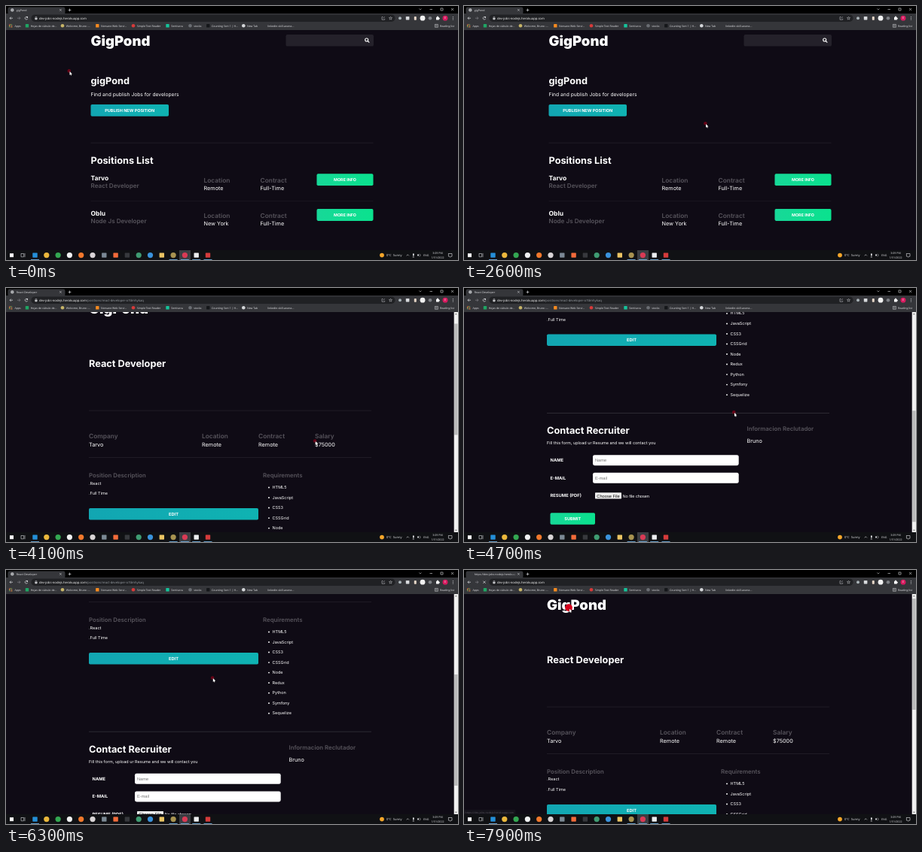
An HTML page with a canvas for the animation above (8 s loop, 600 by 338 pixels).

```html
<!DOCTYPE html>
<html lang="en">
<head>
<title>Job board walkthrough</title>
<style>
html, body { margin: 0; width: 100%; height: 100%; overflow: hidden; background: #0f0b15; }
canvas { display: block; width: 600px; height: 338px; }
</style>
</head>
<body>
<canvas id="stage"></canvas>
<script>
const W = 600, H = 338, LOOP = 8000, TOP = 32, BOTTOM = 325;
const canvas = document.getElementById('stage');
const ctx = canvas.getContext('2d');
const dpr = window.devicePixelRatio || 1;
canvas.width = W * dpr;
canvas.height = H * dpr;

const PAGE = 'Inter, sans-serif';
const UI = '"Open Sans", sans-serif';
const FORM = '"Liberation Sans", sans-serif';
const BG = '#0f0b15', GREY = '#57545c', WHITE = '#fff';
const TEAL = ['#12a6b2', '#0fb3b2'], GREEN = ['#17d898', '#0ae28e'];
const HOST = 'dev-jobs-nodejs.herokuapp.com';
const PATH = '/positions/react-developer-o7dmhykaq';

// Pointer tip as [time, x, y]; scroll offset as [time, y].
const pointerKeys = [
  [0, 84.5, 87], [100, 84.5, 87], [1100, 142.5, 52], [2100, 142.5, 52],
  [3000, 448, 231.5], [3700, 448, 231.5], [4600, 359, 166], [4900, 359, 166],
  [5400, 361, 166], [5700, 361, 166], [6500, 259, 140], [7000, 259, 140],
  [7700, 140, 51.5]
];
const scrollKeys = [
  [4000, 0], [4600, 250.5], [4900, 250.5], [5400, 62], [5700, 62],
  [6600, 250.5], [6910, 250.5], [7560, 0]
];
const clicks = [1600, 3350, 7750];

function at(keys, t, col) {
  if (t <= keys[0][0]) return keys[0][col];
  for (let i = 1; i < keys.length; i++) {
    const a = keys[i - 1], b = keys[i];
    if (t < b[0]) {
      const p = (t - a[0]) / (b[0] - a[0]);
      return a[col] + (b[col] - a[col]) * p * p * (3 - 2 * p);
    }
  }
  return keys[keys.length - 1][col];
}

const within = (t, from, to) => t >= from && t < to;

function rect(x, y, w, h, fill, r = 0) {
  ctx.fillStyle = fill;
  ctx.beginPath();
  ctx.roundRect(x, y, w, h, r);
  ctx.fill();
}

function dot(x, y, r, fill) {
  ctx.fillStyle = fill;
  ctx.beginPath();
  ctx.arc(x, y, r, 0, Math.PI * 2);
  ctx.fill();
}

function lines(color, width, ...paths) {
  ctx.strokeStyle = color;
  ctx.lineWidth = width;
  ctx.beginPath();
  for (const p of paths) {
    ctx.moveTo(p[0], p[1]);
    for (let i = 2; i < p.length; i += 2) ctx.lineTo(p[i], p[i + 1]);
  }
  ctx.stroke();
}

// y is the middle of the capitals.
function text(s, x, y, size, color = WHITE, weight = 400, family = PAGE, align = 'left') {
  ctx.font = `${weight} ${size}px ${family}`;
  ctx.textAlign = align;
  ctx.fillStyle = color;
  ctx.fillText(s, x, y + size * 0.36);
  return ctx.measureText(s).width;
}

const ui = (s, x, y, size = 3.55, color = '#e4e5e8') => text(s, x, y, size, color, 400, UI);
const label = (s, x, y, size = 8.2) => text(s, x, y, size, GREY, 600);
const value = (s, x, y, size = 7.25) => text(s, x, y, size);
const small = (s, x, y) => text(s, x, y, 5.5);
const heading = (s, x, y) => text(s, x, y, 12.75, WHITE, 700);
const logo = x => text('GigPond', x, 46, 18.5, WHITE, 900);

function rule(x, y, color = '#25212b') {
  rect(x, y - 0.3, 375, 0.7, color);
}

function button(s, x, y, w, h, [from, to], size = 5.5) {
  const g = ctx.createLinearGradient(x, 0, x + w, 0);
  g.addColorStop(0, from);
  g.addColorStop(1, to);
  rect(x, y, w, h, g, 1.8);
  text(s, x + w / 2, y + h / 2, size, WHITE, 700, PAGE, 'center');
}

function magnifier(x, y) {
  ctx.strokeStyle = WHITE;
  ctx.lineWidth = 1.1;
  ctx.beginPath();
  ctx.arc(x - 0.6, y - 0.6, 2, 0, Math.PI * 2);
  ctx.moveTo(x + 0.9, y + 0.9);
  ctx.lineTo(x + 3, y + 3);
  ctx.stroke();
}

function jobRow(name, role, place, y) {
  text(name, 112.5, y, 8.5, WHITE, 700);
  label(role, 112.5, y + 10, 8.1);
  label('Location', 262.5, y + 3, 8.35);
  value(place, 262.5, y + 13.5);
  label('Contract', 337.5, y + 3, 8.4);
  value('Full-Time', 337.5, y + 13.5);
  button('MORE INFO', 412.5, y - 5.5, 75, 15.8, GREEN, 5.35);
}

function listPage() {
  logo(112.5);
  rect(371.5, 38, 116.5, 15.6, '#24212a', 2.2);
  magnifier(479.3, 45.6);
  heading('gigPond', 112.5, 99.5);
  text('Find and publish Jobs for developers', 112.5, 117.5, 6.7);
  button('PUBLISH NEW POSITION', 112.5, 131, 103.5, 15.8, TEAL);
  rule(112.5, 182);
  heading('Positions List', 112.5, 205);
  jobRow('Tarvo', 'React Developer', 'Remote', 228.8);
  rule(112.5, 259.7);
  jobRow('Oblu', 'Node Js Developer', 'New York', 275.6);
}

function field(name, hint, y) {
  text(name, 114.5, y, 5.75, WHITE, 700);
  rect(171, y - 7, 193.7, 14, WHITE, 2.4);
  text(hint, 174, y, 5.65, '#757575', 400, FORM);
}

function detailPage(scroll) {
  ctx.save();
  ctx.translate(0, -scroll);
  logo(110);
  heading('React Developer', 110, 119);
  rule(110, 182);
  const facts = [['Company', 'Tarvo', 110], ['Location', 'Remote', 260],
    ['Contract', 'Remote', 335], ['Salary', '$75000', 410]];
  for (const [k, v, x] of facts) {
    label(k, x, 216.3, 8.35);
    value(v, x, 227.3);
  }
  rule(110, 244.4);
  label('Position Description', 110, 267.8, 7.8);
  small('.React', 110, 278.5);
  small('.Full Time', 110, 292.2);
  label('Requirements', 341, 267.8, 7.85);
  ['HTML5', 'JavaScript', 'CSS3', 'CSSGrid', 'Node', 'Redux', 'Python', 'Symfony', 'Sequelize']
    .forEach((s, i) => {
      const y = 284 + i * 13.53;
      dot(349, y + 0.4, 0.95, WHITE);
      small(s, 353.5, y);
    });
  button('EDIT', 110, 312, 225, 15.4, TEAL, 5.7);
  rule(110, 417, '#37343c');
  heading('Contact Recruiter', 110, 440.3);
  small('Fill this form, upload ur Resume and we will contact you', 110, 457);
  label('Informacion Reclutador', 375.5, 437.7, 7.85);
  value('Bruno', 375.5, 454);
  field('NAME', 'Name', 479.7);
  field('E-MAIL', 'E-mail', 503.3);
  text('RESUME (PDF)', 114.5, 526.6, 5.8, WHITE, 700);
  rect(174, 522.8, 35, 8.2, '#efefef', 0.8);
  text('Choose File', 191.5, 527, 5.7, '#111', 400, FORM, 'center');
  text('No file chosen', 210.5, 527, 5.6, WHITE, 400, FORM);
  button('SUBMIT', 114.5, 549.8, 59.5, 15.4, GREEN, 5.6);
  ctx.restore();
  scrollbar(scroll);
}

function scrollbar(scroll) {
  rect(594.7, TOP, 5.3, BOTTOM - TOP, '#f1f1f1');
  rect(595.2, 38 + scroll * 0.5, 4.3, 148, '#b9b9b9');
  ctx.fillStyle = '#505050';
  for (const [y, d] of [[34.6, -1], [322.4, 1]]) {
    ctx.beginPath();
    ctx.moveTo(596, y - d * 0.7);
    ctx.lineTo(598.7, y - d * 0.7);
    ctx.lineTo(597.35, y + d * 0.9);
    ctx.fill();
  }
}

function arrow(x, dir, color) {
  lines(color, 0.7, [x - 2, 16.2, x + 2, 16.2],
    [x + dir * 0.3, 14.5, x + dir * 2, 16.2, x + dir * 0.3, 17.9]);
}

function cross(x, y, r, color = '#dcdde0', width = 0.6) {
  lines(color, width, [x - r, y - r, x + r, y + r], [x + r, y - r, x - r, y + r]);
}

function tabStrip(title) {
  rect(0, 0, W, 10.5, '#000');
  rect(2.5, 1.5, 76, 10, '#35363a', 2.4);
  const loading = title.startsWith('https');
  if (!loading) {
    dot(8.3, 5.4, 2.1, '#cfd1d4');
    lines('#55575b', 0.4, [6.4, 5.4, 10.2, 5.4], [8.3, 3.4, 8.3, 7.4]);
  }
  ctx.save();
  ctx.beginPath();
  ctx.rect(13, 0, 56.5, 11);
  ctx.clip();
  ui(title, 13.8, 5.4, 3.6);
  ctx.restore();
  if (loading) {
    const fade = ctx.createLinearGradient(62, 0, 70, 0);
    fade.addColorStop(0, '#35363a00');
    fade.addColorStop(1, '#35363a');
    rect(62, 2, 8, 8, fade);
  }
  cross(72.4, 5.4, 1.2);
  lines('#dcdde0', 0.7, [82.6, 5.4, 86.4, 5.4], [84.5, 3.5, 84.5, 7.3]);
  lines('#dcdde0', 0.6, [548.4, 3.6, 549.9, 5, 551.4, 3.6], [562.5, 4.5, 566, 4.5],
    [577, 3, 580, 3, 580, 6, 577, 6, 577, 2.8]);
  cross(592.5, 4.5, 1.5);
}

function toolbar(loading, path) {
  rect(0, 10, W, 22, '#35363a');
  rect(33.5, 11.4, 483, 9.6, '#202124', 4.8);
  arrow(7, -1, '#e0e1e4');
  arrow(17, 1, '#818388');
  if (loading) {
    cross(27, 16.2, 1.6, '#e0e1e4', 0.7);
  } else {
    ctx.strokeStyle = '#e0e1e4';
    ctx.lineWidth = 0.7;
    ctx.beginPath();
    ctx.arc(27, 16.2, 1.8, 0.4, 5.6);
    ctx.stroke();
    rect(27.4, 14.1, 1.6, 1.6, '#e0e1e4');
  }
  rect(38.4, 15.8, 3, 2.4, '#c9cbce', 0.4);
  lines('#c9cbce', 0.5, [39, 16, 39, 14.4, 40.8, 14.4, 40.8, 16]);
  const w = ui(HOST, 44, 16.2, 4.2, WHITE);
  if (path) ui(PATH, 44 + w, 16.2, 4.2, '#9aa0a6');

  lines('#b9bbbf', 0.6, [500.5, 14.5, 499, 14.5, 499, 18.2, 502.7, 18.2, 502.7, 16.8],
    [500.6, 16.5, 502.9, 14.3]);
  ctx.strokeStyle = '#c4c6c9';
  ctx.lineWidth = 0.5;
  ctx.beginPath();
  for (let i = 0; i < 10; i++) {
    const a = i * Math.PI / 5 - Math.PI / 2, r = i % 2 ? 1 : 2.2;
    ctx.lineTo(510.5 + r * Math.cos(a), 16.3 + r * Math.sin(a));
  }
  ctx.closePath();
  ctx.stroke();
  dot(523, 16.2, 2, '#a9b3b7');
  rect(530.8, 14, 4.6, 4.4, '#d8dadd', 0.6);
  rect(541.8, 13.9, 3, 4.8, '#e8d8c8', 0.8);
  dot(553, 16.2, 3.4, '#f1f1f1');
  dot(563, 16.2, 2.3, '#7d8085');
  rect(571, 14.8, 3.8, 3.6, WHITE, 0.5);
  dot(573, 14.5, 0.9, WHITE);
  dot(575, 16.6, 0.9, WHITE);
  dot(583, 16.2, 3.4, '#d81b60');
  text('E', 583, 16.2, 3.6, WHITE, 400, UI, 'center');
  for (const d of [-1.7, 0, 1.7]) dot(593.3, 16.2 + d, 0.5, '#e0e1e4');
}

function bookmarks() {
  const colors = ['#e8574c', '#f5b73c', '#4aa567'];
  for (let i = 0; i < 9; i++) {
    const row = Math.floor(i / 3);
    rect(4 + (i % 3) * 1.6, 24.2 + row * 1.6, 1.1, 1.1, colors[(i + row) % 3]);
  }
  ui('Apps', 11.5, 26.3);
  const items = [
    ['#1fa463', 28, 'Hojas de c\u00e1lculo de...'], ['#c8b568', 75, 'Welcome, Bruno -...'],
    ['#f58a1f', 121.3, 'Norvane Web Servi...'], ['#d83a3a', 169, 'Simple Text Reader'],
    ['#15c39a', 214.5, 'Sentivora'], ['#6b6e73', 244.5, 'stocks'],
    ['#15171a', 268.3, 'Counting Sort 1 | H...'], ['#d4d6d9', 315.3, 'New Tab']
  ];
  items.forEach(([color, x, s], i) => {
    if (i % 2) dot(x, 26.3, 2.3, color);
    else rect(x - 2.2, 24.1, 4.4, 4.4, color, 0.6);
    ui(s, x + 4.7, 26.3);
  });
  ui('linkedin-skill-assess...', 347.3, 26.3);
  lines('#dfe0e3', 0.5, [569.4, 24.4, 573.4, 24.4, 573.4, 28.3, 569.4, 28.3, 569.4, 24.2],
    [570.4, 25.7, 572.4, 25.7], [570.4, 27, 572.4, 27]);
  ui('Reading list', 576, 26.3);
}

function taskbar() {
  rect(0, BOTTOM, W, H - BOTTOM, '#101114');
  rect(230, BOTTOM, 15, H - BOTTOM, '#3b3d42');
  rect(5, 329.2, 5, 5, WHITE);
  lines('#d6d7da', 0.6, [20, 329.5, 23.6, 329.5, 23.6, 333.8, 20, 333.8, 20, 329.3],
    [25, 329, 25, 334.2]);
  const icons = [
    ['#2490d8', 1], ['#eab83c'], ['#33a852'], ['#f0f2f2'],
    ['#f1792c'], ['#d9d5d6'], ['#7b8994', 1], ['#f26b3a', 1],
    ['#37393d', 1], ['#3f9c72'], ['#3a93dc'], ['#eac463', 1],
    ['#a89350'], ['#d93a55'], ['#eceeef', 1], ['#d43b3b', 1]
  ];
  icons.forEach(([color, square], i) => {
    const x = 38.5 + i * 15.3;
    if (square) rect(x - 3.2, 328.5, 6.4, 6.2, color, 0.6);
    else dot(x, 331.6, 3.6, color);
    if (i === 0 || i > 11) rect(x - 5.5, 337.2, 11, 0.8, '#76b9ed');
  });
  dot(499, 331.6, 2.9, '#f4a62a');
  ui('0\u00b0C  Sunny', 505, 331.6, 4.1);
  lines('#e4e5e8', 0.6, [531.7, 332.4, 533.3, 330.8, 534.9, 332.4]);
  rect(540, 329.3, 1.7, 3.3, '#e4e5e8', 0.8);
  lines('#e4e5e8', 0.5, [540.8, 332.6, 540.8, 334.2], [539.6, 334.2, 542, 334.2]);
  rect(546.2, 330.6, 1.8, 2, '#e4e5e8');
  lines('#e4e5e8', 0.5, [549, 329.8, 550, 331.6, 549, 333.4]);
  ui('ENG', 554, 331.6, 3.6);
  text('3:09 PM', 573, 328.8, 3.6, '#e4e5e8', 400, UI, 'center');
  text('1/31/2022', 573, 334.6, 3.6, '#e4e5e8', 400, UI, 'center');
  lines('#e4e5e8', 0.6, [587.4, 329.5, 592, 329.5, 592, 333.2, 590.6, 333.2, 589.7, 334.4,
    588.8, 333.2, 587.4, 333.2, 587.4, 329.2]);
}

function statusBar(s, alpha = 1) {
  ctx.globalAlpha = alpha;
  ctx.font = `400 3.5px ${UI}`;
  rect(0, 319, ctx.measureText(s).width + 4, 6, '#292a2d', [0, 1, 0, 0]);
  ui(s, 1.6, 322.3, 3.5);
  ctx.globalAlpha = 1;
}

function pointer(x, y, shape) {
  ctx.save();
  ctx.translate(x, y);
  ctx.lineJoin = 'round';
  if (shape === 'beam') {
    lines('#d8d8d8', 0.6, [0, -2, 0, 3.6], [-1, -2.2, 1, -2.2], [-1, 3.8, 1, 3.8]);
  } else if (shape === 'hand') {
    rect(-0.6, 0, 1.4, 4.5, WHITE, 0.7);
    rect(-1.4, 2.4, 4.6, 4, WHITE, 1.2);
    lines('#222', 0.3, [1, 2.8, 1, 4.2], [2.1, 3, 2.1, 4.3]);
  } else {
    ctx.fillStyle = WHITE;
    lines('#111', 0.4, [0, 0, 0, 4.9, 1.1, 3.9, 1.8, 5.5, 2.6, 5.1, 1.9, 3.6, 3.4, 3.5, 0, 0]);
    ctx.fill();
  }
  ctx.restore();
}

function highlight(x, y, t) {
  const start = clicks.find(c => within(t, c, c + 350));
  if (start === undefined) {
    dot(x - 0.7, y - 0.6, 2.3, 'rgba(150, 0, 24, 0.65)');
  } else {
    const grow = Math.min(1, (t - start) / 100);
    dot(x - 1, y - 1.4, 2.3 + 2.6 * grow, '#d6001c');
  }
}

function draw(t) {
  const scroll = at(scrollKeys, t, 1);
  const detail = t >= 3700, blank = within(t, 3400, 3700);
  const loading = within(t, 1700, 2000) || blank || t >= 7850;
  const path = within(t, 3400, 7850);

  ctx.setTransform(dpr, 0, 0, dpr, 0, 0);
  ctx.textRendering = 'geometricPrecision';
  rect(0, 0, W, H, BG);
  ctx.save();
  ctx.beginPath();
  ctx.rect(0, TOP, W, BOTTOM - TOP);
  ctx.clip();
  if (detail) detailPage(scroll);
  else if (!blank) listPage();
  ctx.restore();

  if (within(t, 1300, 2250)) statusBar('https://' + HOST);
  if (within(t, 3000, 3700)) statusBar('https://' + HOST + PATH);
  if (t >= 7750) statusBar('https://' + HOST, 0.3);

  tabStrip(loading ? 'https://' + HOST : detail ? 'React Developer' : 'gigPond');
  toolbar(loading, path);
  bookmarks();
  taskbar();

  const x = at(pointerKeys, t, 1), y = at(pointerKeys, t, 2);
  const hand = within(t, 950, 2200) || within(t, 2900, 3400);
  highlight(x, y, t);
  pointer(x, y, hand ? 'hand' : within(t, 5300, 5800) ? 'beam' : 'arrow');
}

const began = performance.now();
function tick() {
  draw((performance.now() - began) % LOOP);
  requestAnimationFrame(tick);
}
tick();
</script>
</body>
</html>
```
